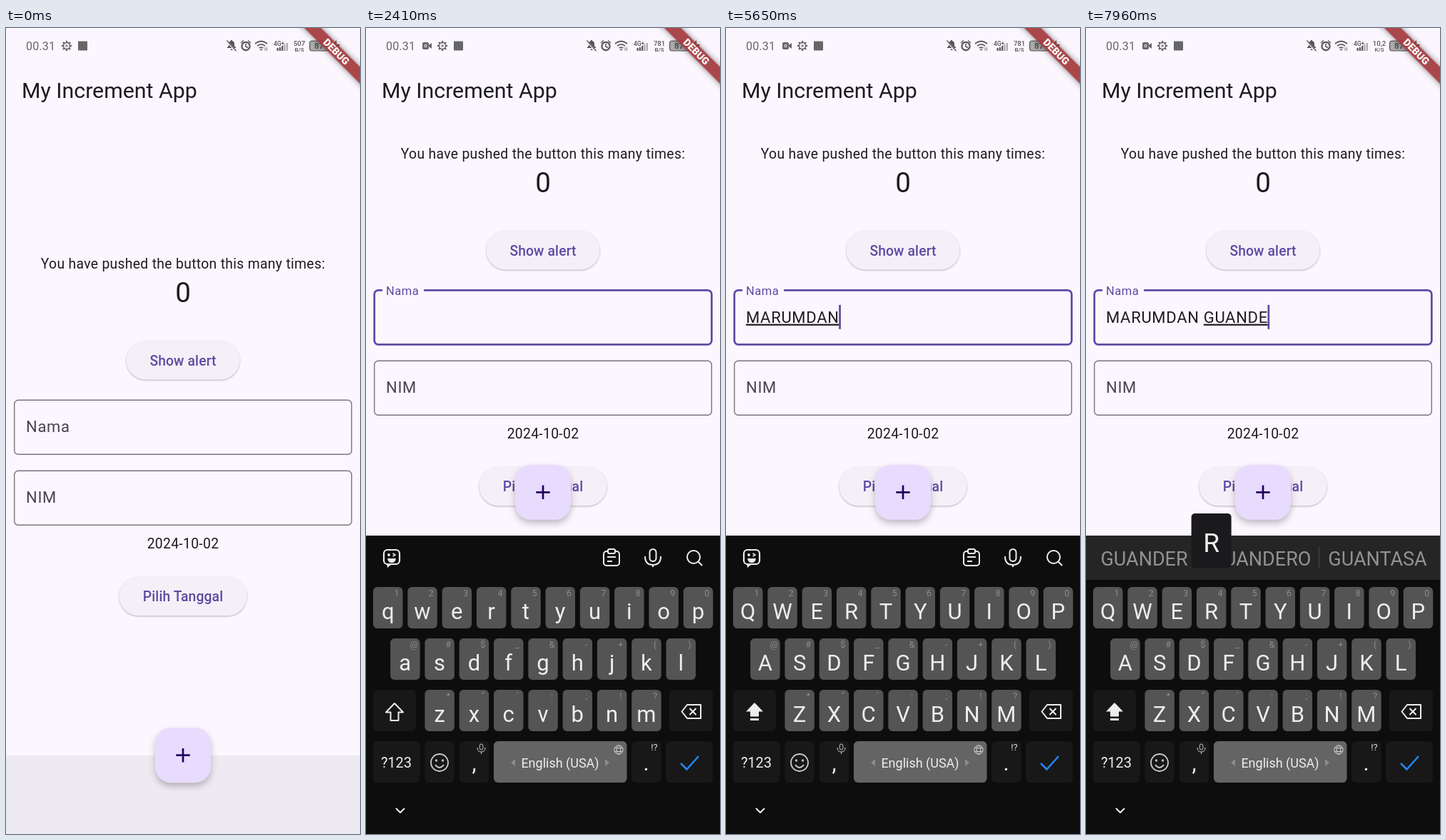
These frames come from a looping animation (496x1129 px, 8 s). An HTML page:

```html
<!DOCTYPE html>
<html lang="id">
<head>
<meta charset="utf-8">
<title>My Increment App</title>
<style>
  html, body { margin: 0; width: 100%; height: 100%; overflow: hidden; background: #fcf6fe; }
  svg { display: block; width: 496px; height: 1129px; font-family: Roboto, sans-serif; }
  text { white-space: pre; }
  .button { filter: drop-shadow(0 1.4px 1.2px rgba(0, 0, 0, .28)); }
  .fab { filter: drop-shadow(0 5px 5px rgba(0, 0, 0, .24)); }
  .ribbon { filter: drop-shadow(0 0 4px rgba(0, 0, 0, .5)); }
</style>
</head>
<body>
<svg id="stage" viewBox="0 0 496 1129"></svg>
<script>
const LOOP = 8000, STEP = 92.59;
const BG = '#fcf6fe', INK = '#1d1b20', PURPLE = '#5d4ba3', KEY = '#545454', DARK = '#181818', LIGHT = '#eee', GREY = '#666';
const stage = document.getElementById('stage');

// Each key press: [step, character]
const presses = [
  ...[...'MARUMDAN'].map((c, i) => [42 + 2 * i, c]),
  [60, ' '], [67, 'G'], [70, 'U'], [73, 'A'], [76, 'N'], [78, 'D'], [80, 'E'], [85, 'R']
];
const hints = {
  M: ['MY', 'MORNING'], MA: ['MAY', 'MAKE'], MAR: ['MARK', 'MARCH'],
  G: ['GO', 'GOOD'], GU: ['GUYS', 'GUESS'], GUA: ['guandeko482\n@mail.test', 'GUANDERO'],
  GUAN: ['GUANDERO', 'GUANTASA'], GUAND: ['GUANDERO', 'GUANTASA'],
  GUANDE: ['GUANDERO', 'GUANTASA'], GUANDER: ['GUANDERO', 'GUANTASA']
};
const rows = [
  { keys: 'qwertyuiop', alt: '1234567890', x: 10, y: 783 },
  { keys: 'asdfghjkl', alt: '@#$_&-+()', x: 34.1, y: 855 },
  { keys: 'zxcvbnm', alt: '*"\':;!?', x: 82.4, y: 927 }
];

const clamp = v => Math.max(0, Math.min(1, v));
const easeOut = v => 1 - (1 - clamp(v)) ** 2;
const text = (x, y, size, fill, s, extra = '') =>
  `<text x="${x}" y="${y}" font-size="${size}" fill="${fill}" ${extra}>${s.replace(/&/g, '&amp;')}</text>`;
const mid = (x, y, size, fill, s, extra = '') => text(x, y, size, fill, s, 'text-anchor="middle" ' + extra);
const rect = (x, y, w, h, r, fill, extra = '') =>
  `<rect x="${x}" y="${y}" width="${w}" height="${h}" rx="${r}" fill="${fill}" ${extra}/>`;
const line = (d, stroke, w = 2, fill = 'none') =>
  `<path d="${d}" stroke="${stroke}" stroke-width="${w}" fill="${fill}" stroke-linejoin="round"/>`;
const shape = (d, fill) => `<path d="${d}" fill="${fill}"/>`;
const ring = (x, y, r, stroke, w = 2, fill = 'none') =>
  `<circle cx="${x}" cy="${y}" r="${r}" stroke="${stroke}" stroke-width="${w}" fill="${fill}"/>`;
const group = (x, y, s) => `<g transform="translate(${x} ${y})">${s}</g>`;

function gear(x) {
  let s = ring(0, 0, 4.6, GREY, 1.7) + ring(0, 0, 1.3, GREY, 1);
  for (let a = 0; a < 360; a += 45) s += `<path d="M0-7.2V-5" stroke="${GREY}" stroke-width="2.2" transform="rotate(${a})"/>`;
  return group(x, 25, s);
}

function statusBar(n) {
  const recording = n >= 4, shift = recording ? 22 : 0;
  const [speed, unit] = n >= 64 ? ['10,2', 'K/S'] : n >= 9 ? ['781', 'B/S'] : ['507', 'B/S'];
  let s = text(28, 31, 16, GREY, '00.31', 'letter-spacing=".2"');
  if (recording) s += rect(79, 20, 9, 10, 2, GREY) + shape('M88 24L92 21V29L88 26Z', GREY) + ring(83.5, 25, 1.7, BG, 1);
  s += gear(85 + shift) + rect(101 + shift, 18.5, 13, 13, 1, GREY);
  s += shape('M310 28V27L312 25V22Q312 19 315 18V17H317V18Q320 19 320 22V25L322 27V28ZM314 29.5H318Q316 33 314 29.5Z', '#555') +
    line('M309 18L322 32', BG, 2.6) + line('M309.5 17.5L322.5 32', '#555', 1.4);
  s += ring(336, 25.5, 5.6, '#555', 2.2) + line('M336 22V26L339 27.5M329 21L333 17.5M343 21L339 17.5', '#555', 1.5);
  s += line('M349 22Q357.5 15 366 22M352 25.2Q357.5 20.5 363 25.2M354.7 28Q357.5 26 360.3 28', '#555', 1.7) +
    shape('M355.5 29.5H359.5L357.5 32Z', '#555') + line('M363 27V32M365.5 27V32', '#777', 1);
  s += text(375, 24.5, 8.5, '#555', '4G+', 'font-weight="500"');
  [4, 5, 7, 9, 11].forEach((h, i) => s += rect(379.5 + i * 3.3, 32 - h, 2.2, h, 0, i < 3 ? '#555' : '#aaa'));
  s += mid(411, 24.5, 9.5, '#555', speed, 'font-weight="500"') + mid(411, 33, 8, '#555', unit, 'font-weight="500"');
  s += rect(425.5, 18, 27, 14, 3.5, '#aaa', 'stroke="#555" stroke-width="1.2"') + rect(453.5, 22, 2, 6, 1, '#555') +
    mid(438.5, 29, 11.5, '#444', '87', 'font-weight="500"') + shape('M463 17L457 26H461L460 33L468 23H463Z', '#444');
  return s;
}

const ribbon = () => `<g transform="translate(462.9 33.1) rotate(45)">
  ${rect(-80, -8.3, 160, 16.6, 0, '#a63e42', 'opacity=".95" class="ribbon"')}
  ${mid(0, 5, 14, '#fff', 'DEBUG', 'font-weight="900"')}</g>`;

const button = (x, y, w, label) => rect(x, y, w, 54.5, 27.2, '#f5f0f7', 'class="button"') +
  mid(248, y + 34.5, 19.3, PURPLE, label, 'font-weight="500" letter-spacing=".14"');

const field = (y, focused) => rect(11.7, y, 472.6, 76, 5.5, 'none',
  focused ? `stroke="${PURPLE}" stroke-width="2.75"` : 'stroke="#79747e" stroke-width="1.4"');

function nameField(n, typed) {
  const focused = n >= 18, y = 521.3;
  const p = focused ? easeOut((n - 17.2) * STEP / 167) : 0;
  let s = field(y, focused);
  if (p) s += rect(52 - 29 * p, y - 3, 58 * p, 6, 0, BG);
  s += text(28, y + 45 - 38.8 * p, 22 - 5.5 * p, focused ? PURPLE : '#49454f', 'Nama', `letter-spacing="${.69 - .17 * p}"`);
  const cut = typed.lastIndexOf(' ') + 1;
  s += `<text id="value" x="28" y="${y + 45.3}" font-size="22" letter-spacing=".69" fill="${INK}">` +
    `${typed.slice(0, cut)}<tspan text-decoration="underline">${typed.slice(cut)}</tspan></text>`;
  const reset = presses.reduce((r, [at]) => at + 2 <= n ? at + 2 : r, 18);
  if (focused && Math.floor((n - reset) * STEP / 500) % 2 === 0) s += rect(27.6, y + 20.5, 2.75, 34, 0, PURPLE, 'id="caret"');
  return s;
}

function page(n, typed, inset) {
  const top = 1129 - inset;
  const lift = Math.min(0, (top - 1019) / 2);
  let s = rect(0, 0, 496, 1129, 0, BG) + rect(0, 1019, 496, 110, 0, '#eeeaf2');
  s += text(22, 98, 30.3, INK, 'My Increment App');
  s += group(0, lift,
    mid(248, 337.3, 19.3, INK, 'You have pushed the button this many times:', 'letter-spacing=".34"') +
    mid(248, 383.5, 38.6, INK, '0') +
    button(168.5, 438, 159, 'Show alert') +
    nameField(n, typed) +
    field(620.3, false) + text(28, 665.3, 22, '#49454f', 'NIM', 'letter-spacing=".69"') +
    mid(248, 728.5, 19.3, INK, '2024-10-02', 'letter-spacing=".34"') +
    button(158.5, 768.7, 179, 'Pilih Tanggal'));
  s += group(248, Math.min(1018.7, top - 60.7),
    rect(-39, -38.5, 78, 77, 22, '#e7dcfd', 'class="fab"') + line('M-9.7 0H9.7M0-9.7V9.7', '#21005d', 2.7));
  return s;
}

function toolbar() {
  return rect(25, 731, 22, 20, 5, 'none', `stroke="${LIGHT}" stroke-width="2.2"`) +
    shape('M29 750L30 756L36 751ZM30 743H42Q41 749 36 749Q31 749 30 743Z', LIGHT) +
    ring(32, 738, 1.2, LIGHT, 1.4, LIGHT) + line('M37.5 736L41 738L37.5 740', LIGHT, 1.6) +
    rect(333, 733, 22, 20, 4, 'none', `stroke="${LIGHT}" stroke-width="2"`) +
    rect(339, 730, 10, 6, 2, '#0d0d0d', `stroke="${LIGHT}" stroke-width="2"`) +
    line('M338 741H350M338 747H345', LIGHT) +
    rect(397.5, 730, 9, 17, 4.5, 'none', `stroke="${LIGHT}" stroke-width="2"`) +
    line('M391 740Q391 752 402 752Q413 752 413 740M402 752V755', LIGHT) +
    ring(459, 741, 9, LIGHT) + line('M465.5 747.5L471 753', LIGHT);
}

function suggestions(word) {
  const words = [word, ...(hints[word] || [word + 'I', word + 'A'])];
  return rect(0, 711, 496, 62, 0, '#252525') +
    line('M163 727V757M326.5 727V757', '#484848', 1) +
    words.map((w, i) => {
      const x = [81.5, 245, 408.5][i], [first, second] = w.split('\n');
      return second
        ? mid(x, 742, 18, '#999', first, 'font-weight="700"') + mid(x, 759, 13.5, '#999', second)
        : mid(x, 752.5, 27, '#929292', first);
    }).join('');
}

function functionKeys(caps) {
  const arrow = 'M40 946L52 958.5H45.5V970H34.5V958.5H28Z';
  const locked = 'M40 945L52 957.5H46V964.5H34V957.5H28Z';
  let s = rect(10, 927, 60, 58, 6, DARK) + rect(425, 927, 61, 58, 6, DARK);
  s += caps ? shape(locked, LIGHT) + rect(34, 967, 12, 3, 0, LIGHT) : line(arrow, LIGHT);
  s += line('M450 948H469V967H450L442.5 957.5ZM453.5 953L462.5 962M462.5 953L453.5 962', LIGHT);
  s += rect(10, 999, 65.5, 58, 6, DARK) + mid(42.5, 1036, 20, LIGHT, '?123');
  [82.4, 130.7, 372].forEach(x => s += rect(x, 999, 41.5, 58, 6, DARK));
  s += ring(103, 1029, 12, '#ccc', 1.8) + line('M97 1032Q103 1040 109 1032', '#ccc', 1.8) +
    ring(98.5, 1026, 1, '#ccc', 1.3) + ring(107.5, 1026, 1, '#ccc', 1.3);
  s += mid(151.5, 1040, 31, LIGHT, ',') + rect(159.3, 1003, 4.6, 8, 2.3, 'none', 'stroke="#ccc"') +
    line('M156 1008Q156 1014 161.6 1014Q167 1014 167 1008M161.6 1014V1017', '#ccc', 1);
  s += rect(179, 999, 186.5, 58, 6, '#646464') + mid(272, 1035.5, 18, LIGHT, 'English (USA)') +
    shape('M209 1024V1034L203 1029ZM335 1024V1034L341 1029Z', '#8d8d8d');
  s += ring(354, 1011, 6.2, '#ccc', 1) + `<ellipse cx="354" cy="1011" rx="2.8" ry="6.2" fill="none" stroke="#ccc"/>` +
    line('M348.5 1008.5H359.5M348.5 1013.5H359.5', '#ccc', 1);
  s += mid(392.5, 1040, 31, LIGHT, '.') + mid(404, 1012, 13, '#ddd', '!?');
  s += rect(420, 999, 66, 58, 6, DARK) + line('M441 1030L449.5 1038.5L466 1020', '#2385f2', 2.6);
  return s + line('M42 1093L48 1099L54 1093', LIGHT, 2);
}

function keyboard(n, word, shown) {
  const caps = n >= 37;
  let keys = '', popup = '';
  for (const { keys: letters, alt, x, y } of rows) {
    [...letters].forEach((c, i) => {
      const left = x + 48.3 * i, center = left + 20.7, upper = c.toUpperCase();
      const age = presses.filter(([at, k]) => k === upper && at <= n).map(([at]) => n - at).pop();
      keys += rect(left, y, 41.5, 58, 6, age === 0 ? DARK : KEY) +
        mid(center, y + 44.5, 31, LIGHT, caps ? upper : c) +
        mid(left + 33, y + 13, 12.5, '#8c8c8c', alt[i]);
      if (age < 2) popup += rect(center - 28, y - 103, 56, 76.5, 5, '#1a1a1c') + mid(center, y - 49, 37, LIGHT, upper);
    });
  }
  return group(0, 418 - shown, rect(0, 711, 496, 420, 0, '#0d0d0d') +
    (word ? suggestions(word) : toolbar()) + keys + functionKeys(caps) + popup);
}

function draw(n) {
  const ms = n * STEP;
  const entered = delay => presses.filter(([at]) => at + delay <= n).map(([, c]) => c).join('');
  const word = entered(1).split(' ').pop();
  const inset = 418 * easeOut((ms - 2056) / 300);
  const shown = 418 * easeOut((ms - 2095) / 300);
  stage.innerHTML = page(n, entered(2), inset) + (shown ? keyboard(n, word, shown) : '') + statusBar(n) + ribbon();
  const caret = document.getElementById('caret');
  if (caret) caret.setAttribute('x', 27.6 + document.getElementById('value').getComputedTextLength());
}

let last = -1;
function tick() {
  const n = Math.floor(performance.now() % LOOP / STEP + .05);
  if (n !== last) draw(last = n);
  requestAnimationFrame(tick);
}
tick();
</script>
</body>
</html>
```
